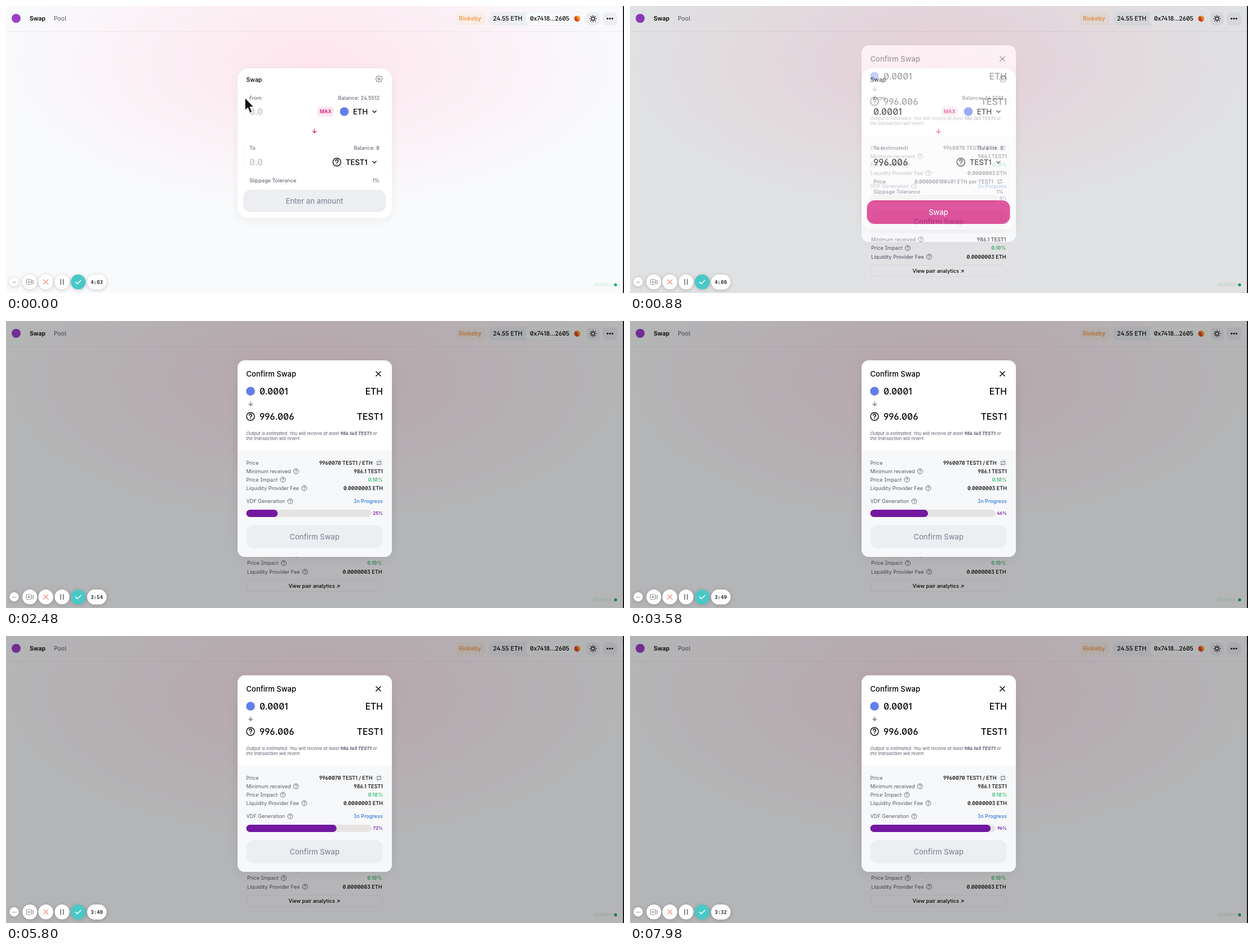
An HTML page that plays this animation: 1097 by 511 pixels, repeating every 8000 ms.

```html
<!DOCTYPE html>
<html lang="en">
<head>
<meta charset="utf-8">
<title>Swap</title>
<style>
html, body { margin: 0; width: 100%; height: 100%; overflow: hidden; background: #f9fafc; }
svg { display: block; width: 1097px; height: 511px; }
text { font-family: Inter, sans-serif; font-feature-settings: 'ss01', 'ss02', 'cv01', 'cv03'; white-space: pre; }
.mono { font-family: 'DejaVu Sans Mono', monospace; font-feature-settings: normal; }
.line { fill: none; stroke-linecap: round; stroke-linejoin: round; }
.card { filter: drop-shadow(0 4px 8px #0000000d); }
.float { filter: drop-shadow(0 1px 3px #0003); }
</style>
</head>
<body>
<svg id="stage" viewBox="0 0 1097 511"></svg>
<script>
const INK = '#000', GREY = '#565a69', PALE = '#edeef2', MUTED = '#888d9b', PINK = '#d3006d',
      GREEN = '#35b56b', BLUE = '#2f78e0', PURPLE = '#7318a0', COIN = '#627eea';
const SMALL = 9.13, BODY = 10.44, HEAD = 13.05, BIG = 15.66;

// y is the middle of the capitals
const text = (x, y, s, size = SMALL, fill = INK, weight = 500, anchor = 'start', more = '') =>
  `<text x="${x}" y="${y + size * .364}" font-size="${size}" fill="${fill}" font-weight="${weight}" text-anchor="${anchor}" ${more}>${s}</text>`;
const label = (x, y, s) => text(x, y, s, SMALL, GREY, 400);
const right = (x, y, s, size, fill, weight) => text(x, y, s, size, fill, weight, 'end');
const mid = (x, y, s, size, fill, weight, more) => text(x, y, s, size, fill, weight, 'middle', more);
const box = (x, y, w, h, r, fill, more = '') =>
  `<rect x="${x}" y="${y}" width="${w}" height="${h}" rx="${r}" fill="${fill}" ${more}/>`;
const dot = (x, y, r, fill, more = '') => `<circle cx="${x}" cy="${y}" r="${r}" fill="${fill}" ${more}/>`;
const line = (d, stroke = INK, w = 1.2) => `<path class="line" d="${d}" stroke="${stroke}" stroke-width="${w}"/>`;
const group = (id, s, more = '') => `<g id="${id}" ${more}>${s}</g>`;

const ring = (x, y, r, color, w) => dot(x, y, r, 'none', `stroke="${color}" stroke-width="${w}"`);
const help = (x, y, k = 1, color = GREY) =>
  `<g transform="translate(${x} ${y}) scale(${k})">` + ring(0, 0, 4.5, color, .9) +
  line('M-1.4 -1.2A1.45 1.45 0 1 1 .5 .1Q0 .4 0 .9M0 2.3v.1', color, .9) + '</g>';
const arrow = (x, y, color) => line(`M${x} ${y - 3.3}v6.6m-3.2 -3.2l3.2 3.2l3.2 -3.2`, color, 1.1);
const chevron = (x, y) => line(`M${x - 3.3} ${y - 1.6}l3.3 3.3l3.3 -3.3`, INK, 1.3);
const repeat = (x, y) => line(`M${x - 3.6} ${y - .6}v-1.9h7l-1.5 -1.5m1.5 1.5l-1.5 1.5M${x + 3.6} ${y + .6}v1.9h-7l1.5 -1.5m-1.5 1.5l1.5 1.5`, GREY, .85);
const cross = (x, y, r, color, w) => line(`M${x - r} ${y - r}l${2 * r} ${2 * r}m0 ${-2 * r}l${-2 * r} ${2 * r}`, color, w);
const dots = (x, y, gap, r, color) => [-gap, 0, gap].map(d => dot(x + d, y, r, color)).join('');

function polar(n, f) {
  return Array.from({ length: n }, (_, i) => {
    const a = i / n * 2 * Math.PI, r = f(a);
    return (r * Math.cos(a)).toFixed(2) + ' ' + (r * Math.sin(a)).toFixed(2);
  });
}
const gear = (x, y) => `<g transform="translate(${x} ${y})">` +
  line('M' + polar(64, a => 5.3 + .7 * Math.cos(8 * a)).join('L') + 'Z', GREY, 1) + ring(0, 0, 1.9, GREY, 1) + '</g>';
function sun(x, y) {
  const a = polar(8, () => 4.6), b = polar(8, () => 6);
  return `<g transform="translate(${x} ${y})">` + ring(0, 0, 2.9, INK, 1.1) +
    line(a.map((p, i) => `M${p}L${b[i]}`).join(''), INK, 1.1) + '</g>';
}

const header =
  `<path d="M0 45.5H1095" stroke="#0000000d"/>` +
  dot(18, 22, 8, '#9a40c8') +
  text(42, 22.5, 'Swap', BODY, INK, 600) + text(85, 22.5, 'Pool', BODY, GREY, 400) +
  box(798, 11, 53, 24, 8, '#f8eee9') + mid(823.7, 22.5, 'Rinkeby', BODY, '#f2953f', 500) +
  box(857, 10.5, 167, 24.5, 8, PALE) + box(923, 11, 101, 23.5, 8, '#f8f9fb') +
  text(864.5, 22.5, '24.55 ETH', BODY) + text(930, 22.5, '0x7418...2605', BODY) +
  dot(1014, 22.5, 5.3, '#f5a01c') + '<path d="M1009.2 24.8A5.3 5.3 0 0 1 1012 17.6L1017 26.8A5.3 5.3 0 0 1 1009.2 24.8" fill="#e2452b"/>' +
  box(1030, 11, 24, 23.5, 8, PALE) + sun(1042, 22.5) +
  box(1059, 11, 26, 23.5, 8, PALE) + dots(1072, 22.5, 4.3, 1.45, INK);

const facts = (x, end, ys) =>
  label(x, ys[0], 'Minimum received') + help(x + 88.3, ys[0]) + right(end, ys[0], '986.1 TEST1') +
  label(x, ys[1], 'Price Impact') + help(x + 65, ys[1]) + right(end, ys[1], '0.10%', SMALL, GREEN) +
  label(x, ys[2], 'Liquidity Provider Fee') + help(x + 103, ys[2]) + right(end, ys[2], '0.0000003 ETH');

const details = box(417, 378, 261, 113, 13, '#fbfbfd') + facts(428, 667.5, [415.5, 431, 446.3]) +
  box(428, 461.5, 239.5, 20, 5, 'none', `stroke="${PALE}"`) + mid(547.5, 471.5, 'View pair analytics ↗');

const panel = y => box(421, y, 253, 56, 13, 'none', 'stroke="#f7f8fa"');
const swap =
  `<clipPath id="below"><path d="M400 380H700V511H400Z"/></clipPath>` +
  `<g clip-path="url(#below)">${group('details', details)}</g>` +
  `<rect id="card" class="card" x="411" y="111" width="274" height="267" rx="19.5" fill="#fff"/>` +
  text(426.5, 131, 'Swap', BODY) + gear(662, 130) + panel(150) + panel(240) +
  label(432, 163.5, 'From') + right(663, 163.5, 'Balance: 24.5512', SMALL, GREY, 400) +
  text(432, 188.3, '', BIG, INK, 500, 'start', 'id="amount"') +
  box(552.5, 179, 29.5, 18, 5, '#fdeaf1') + mid(567.3, 188, 'MAX', SMALL, PINK) +
  dot(600.5, 188, 7.8, COIN) + text(616, 188.3, 'ETH', HEAD) + chevron(654, 188) +
  arrow(547.5, 222.5, PINK) +
  text(432, 253, 'To', SMALL, GREY, 400, 'start', 'id="to"') + right(663, 253, 'Balance: 0', SMALL, GREY, 400) +
  text(432, 278, '', BIG, INK, 500, 'start', 'id="output"') +
  help(587.3, 278, 1.55, INK) + text(603, 278, 'TEST1', HEAD) + chevron(654, 278) +
  group('empty', label(432, 311, 'Slippage Tolerance') + right(663, 311, '1%', SMALL, GREY, 400) +
    box(421, 327, 253, 40, 13, PALE) + mid(547.5, 347.3, 'Enter an amount', HEAD, MUTED)) +
  group('quoted', label(432, 312.5, 'Price') + right(645, 312.5, '0.000000100401 ETH per TEST1', SMALL, GREY, 400) + repeat(656.5, 312.5) +
    label(432, 330.5, 'Slippage Tolerance') + right(663, 330.5, '1%', SMALL, GREY, 400) +
    box(420.5, 346, 254, 42, 13.5, PINK) + mid(547.5, 367, 'Swap', HEAD, '#fff'));

const modal =
  box(411, 70, 274, 350, 13, '#fff', 'class="card"') +
  '<path d="M411 230H685V407A13 13 0 0 1 672 420H424A13 13 0 0 1 411 407Z" fill="#f7f8fa"/>' +
  text(426.5, 94, 'Confirm Swap', HEAD) + cross(661, 94, 4.1, INK, 1.4) +
  dot(434, 125, 7.8, COIN) + text(450, 125, '0.0001', BIG) + right(669, 125, 'ETH', BIG) +
  arrow(434.3, 147.3, GREY) +
  help(434, 170, 1.55, INK) + text(450, 170, '996.006', BIG) + right(669, 170, 'TEST1', BIG) +
  text(426.5, 200, 'Output is estimated. You will receive at least <tspan font-weight="700">986.145 TEST1</tspan> or', 7.83, GREY, 400, 'start', 'font-style="italic"') +
  text(426.5, 209.5, 'the transaction will revert.', 7.83, GREY, 400, 'start', 'font-style="italic"') +
  label(426.5, 252.8, 'Price') + right(650.5, 252.8, '9960070 TEST1 / ETH') + dot(662, 252.8, 7, PALE) + repeat(662, 252.8) +
  facts(426.5, 669, [267.6, 282.6, 297.6]) +
  label(426.5, 321, 'VDF Generation') + help(504.5, 321) + right(669, 321, 'In Progress', SMALL, BLUE) +
  box(426.5, 336, 227, 13, 6.5, '#e5e4e2', 'id="track"') + box(426.5, 336, 0, 13, 6.5, PURPLE, 'id="bar"') +
  right(669, 342.6, '<tspan id="percent"></tspan>', 7.9, PURPLE, 600) +
  box(426.5, 363.5, 242.5, 41, 13, PALE) + mid(547.7, 384.3, 'Confirm Swap', HEAD, MUTED);

const disc = (x, r, fill) => dot(x, 491.3, r, fill, 'class="float"');
const recorder =
  disc(14.5, 8.2, '#fff') + dots(14.5, 491.8, 2.4, .7, '#555') +
  disc(42.3, 13.2, '#fff') + box(36.3, 487, 8.6, 8.8, 1.2, 'none', 'stroke="#8b8b8b"') +
  line('M45 490.5l3.3 -2v6l-3.3 -2M40.6 489.4v4m-2 -2h4', '#8b8b8b', 1) +
  disc(70.7, 13.2, '#fff') + cross(70.7, 491.3, 4.2, '#f28a78', 1.2) +
  disc(99.5, 13.2, '#fff') + line('M97.2 486.8v9m4.6 -9v9', '#777', 1.7) +
  disc(128.2, 13.2, '#4ac8c8') + line('M123.6 491.6l3.1 3.1l6 -6.2', '#fff', 1.6) +
  box(144, 478, 34.5, 26.8, 13.4, '#fff', 'class="float"') +
  mid(161, 491.5, '', 9, '#333', 700, 'id="clock" class="mono"');

const pointer = group('pointer',
  '<path d="M0 0V23L5.2 18.3L9 27.5L13 25.8L9.1 16.8H16Z" fill="#111" stroke="#fff" stroke-width="1.2"/>');

document.getElementById('stage').innerHTML =
  `<defs><radialGradient id="glow"><stop stop-color="#fee5ee"/><stop offset="1" stop-color="#fee5ee" stop-opacity="0"/></radialGradient></defs>` +
  box(0, 0, 1097, 511, 0, '#f9fafc') +
  '<ellipse cx="547.5" cy="102" rx="547.5" ry="255.5" fill="url(#glow)"/>' +
  header + swap +
  right(1075.5, 496.5, '10200031', 7.2, '#35b56b', 400).replace('<text', '<text opacity=".25"') + dot(1082, 496.5, 2.7, '#27ae60') +
  group('shade', box(0, 0, 1097, 511, 0, '#000', 'opacity=".28"') + modal) +
  recorder + pointer + box(1095.3, 0, 2, 511, 0, '#000');

const $ = id => document.getElementById(id);
const set = (id, attrs) => { for (const k in attrs) $(id).setAttribute(k, attrs[k]); };
const show = (id, on) => set(id, { visibility: on ? 'visible' : 'hidden' });
const clamp = v => Math.max(0, Math.min(1, v));

const KEYS = [240, 300, 350, 400, 450, 540], QUOTE = 640;
const PROGRESS = [[1000, 0], [2480, 25.1], [3580, 46.1], [5800, 72.1], [7980, 96.1], [8000, 96.3]];

function progress(t) {
  if (t <= PROGRESS[0][0]) return 0;
  const i = PROGRESS.findIndex(p => t <= p[0]);
  const [t0, a] = PROGRESS[i - 1], [t1, b] = PROGRESS[i];
  return a + (b - a) * (t - t0) / (t1 - t0);
}

function draw(t) {
  const typed = '0.0001'.slice(0, KEYS.filter(k => t >= k).length);
  const quoted = t >= QUOTE;
  $('amount').textContent = typed || '0.0';
  set('amount', { fill: typed ? INK : '#c3c5cb' });
  $('output').textContent = quoted ? '996.006' : '0.0';
  set('output', { fill: quoted ? INK : '#c3c5cb' });
  $('to').textContent = quoted ? 'To (estimated)' : 'To';
  show('empty', !quoted);
  show('quoted', quoted);
  set('card', { height: quoted ? 287 : 267 });
  show('details', quoted);
  set('details', { transform: `translate(0 ${-113 * (1 - clamp((t - QUOTE) / 80)) ** 2})` });

  const move = clamp(t / 160);
  show('pointer', t < KEYS[0]);
  set('pointer', { transform: `translate(${424 + 14 * move} ${163 + 16 * move})` });

  set('shade', { opacity: clamp((t - 860) / 60) });
  const p = progress(t), width = p < 10 ? 227 : 222.3;
  set('track', { width });
  set('bar', { width: width * p / 100 });
  $('percent').textContent = Math.floor(p) + '%';

  const s = Math.floor(243.95 - t * .004);
  $('clock').textContent = Math.floor(s / 60) + ':' + String(s % 60).padStart(2, '0');
}

const start = performance.now();
function tick(now) {
  draw(Math.max(0, now - start) % 8000);
  requestAnimationFrame(tick);
}
draw(0);
requestAnimationFrame(tick);
</script>
</body>
</html>
```
